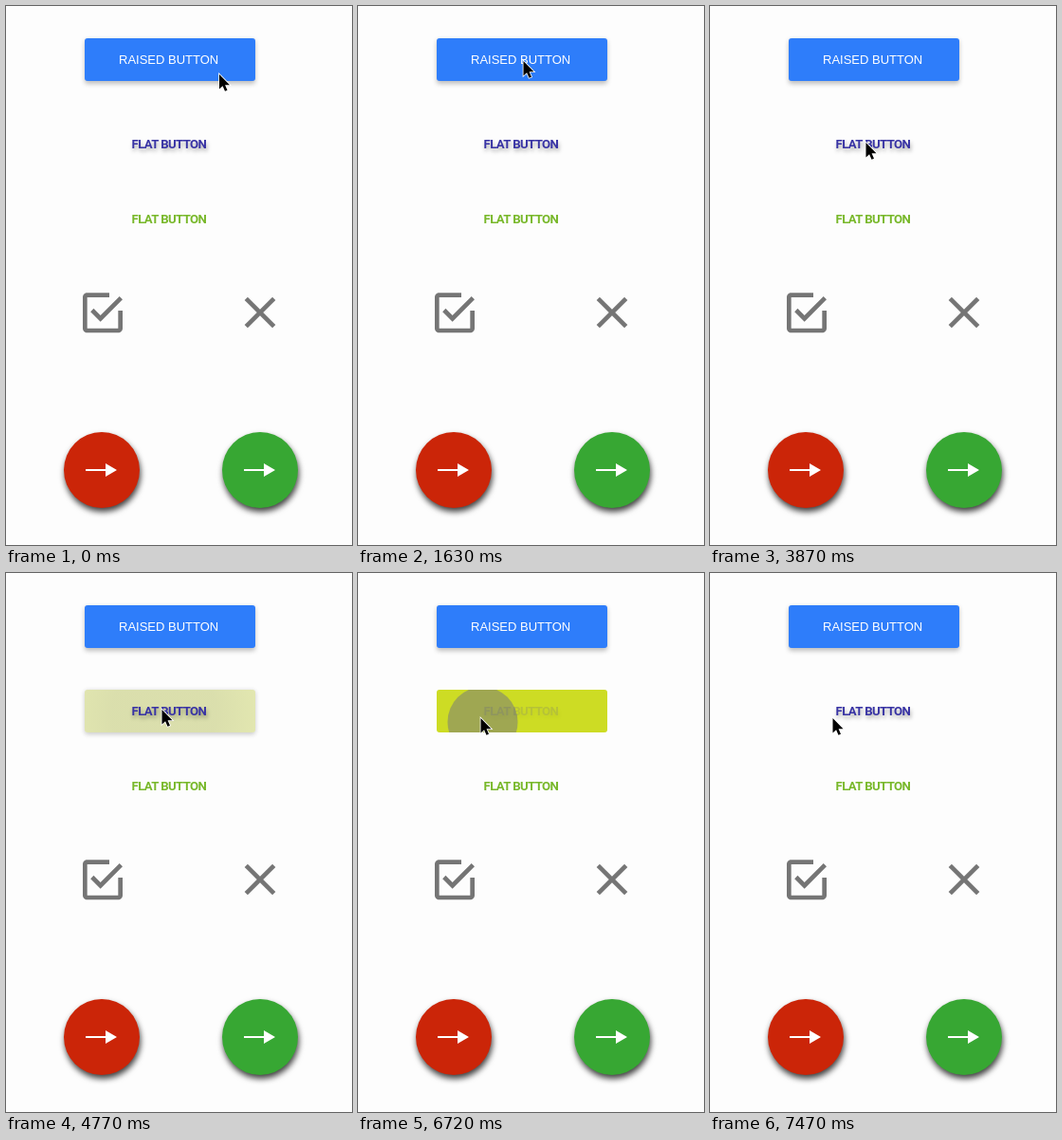
Animation, 365 px wide and 568 px high, one loop 8000 ms. Source, as an HTML page:

```html
<!DOCTYPE html>
<html lang="en">
<head>
<meta charset="utf-8">
<title>Buttons</title>
<style>
  html, body { margin: 0; width: 100%; height: 100%; overflow: hidden; background: #fdfdfd; }
  svg { display: block; width: 100%; height: 100%; }
  text { white-space: pre; }
  .raised { font: 13px "Liberation Sans", Arial, sans-serif; fill: #fff; }
  .flat { font: bold 13.2px Roboto, "Liberation Sans", sans-serif; letter-spacing: -.6px; }
  .lift { filter: drop-shadow(1px 3px 2px rgba(0, 0, 0, .32)); }
  .soft { filter: blur(2.5px); }
  .fab { filter: drop-shadow(1.5px 4px 3px rgba(0, 0, 0, .75)); }
</style>
</head>
<body>
<svg viewBox="0 0 365 568">
  <defs>
    <radialGradient id="fade">
      <stop offset=".5" stop-color="#737480"/>
      <stop offset="1" stop-color="#737480" stop-opacity=".5"/>
    </radialGradient>
    <clipPath id="raisedClip"><rect x="83" y="34" width="180" height="45" rx="3"/></clipPath>
    <clipPath id="flatClip"><rect x="83" y="123" width="180" height="45" rx="3"/></clipPath>
    <g id="arrow" fill="#fff">
      <path d="M-17 -1H5V1H-17z M4 -7L16 0L4 7z"/>
    </g>
  </defs>

  <rect id="raisedShadow" class="soft" x="83" y="36" width="180" height="46" rx="3" fill="#000"/>
  <rect x="83" y="34" width="180" height="45" rx="3" fill="#2e7dfa"/>
  <g clip-path="url(#raisedClip)"><circle id="raisedRipple"/></g>
  <text class="raised" x="119" y="60.5">RAISED BUTTON</text>

  <rect id="flatShadow" class="soft" x="83" y="124" width="180" height="46" rx="3" fill="#000"/>
  <rect id="flatBase" x="83" y="123" width="180" height="45" rx="3" fill="#fdfdfd"/>
  <rect id="flatFill" x="83" y="123" width="180" height="45" rx="3" fill="#cddc24"/>
  <g clip-path="url(#flatClip)"><circle id="flatRipple"/></g>
  <g id="flatText"><text class="flat lift" x="132.5" y="150.2" fill="#3833a4">FLAT BUTTON</text></g>

  <text class="flat" x="132.5" y="229.2" fill="#78b82a">FLAT BUTTON</text>

  <g fill="#757575">
    <path transform="translate(74 295.3) scale(2.333)" d="M19 19H5V5h10V3H5c-1.1 0-2 .9-2 2v14c0 1.1.9 2 2 2h14c1.1 0 2-.9 2-2v-8h-2zM7.91 10.08L6.5 11.5 11 16 21 6 19.59 4.58 11 13.17z"/>
    <path transform="translate(240 295) scale(2.333)" d="M19 6.41L17.59 5 12 10.59 6.41 5 5 6.41 10.59 12 5 17.59 6.41 19 12 13.41 17.59 19 19 17.59 13.41 12z"/>
  </g>

  <circle class="fab" cx="101" cy="489" r="40" fill="#cb2508"/>
  <circle class="fab" cx="268" cy="489" r="40" fill="#37a733"/>
  <use href="#arrow" x="101" y="489"/>
  <use href="#arrow" x="268" y="489"/>

  <path id="cursor" d="M0 0V15.5L3.6 12.2L6 17.8L8.5 16.7L6.1 11.2H11z" stroke="#fff" stroke-width="1.6" paint-order="stroke"/>
</svg>
<script>
const LOOP = 8000, STEP = 150;
const $ = id => document.getElementById(id);
const set = (id, attrs) => { for (const k in attrs) $(id).setAttribute(k, attrs[k]); };

// Cursor moves: start time, number of steps, destination
const moves = [[1180, 4, 174.5, 58], [3120, 6, 164.5, 144], [5970, 3, 129.5, 153]];
// Presses: start time, time the button is at rest again
const raisedPresses = [[290, 740], [2070, 2670]];
const flatPresses = [[4320, 5070], [6720, 7470]];

const raised = { r: [37, 100, 105], tint: [.5, .35, .12], shadow: [.1, .12, .19] };
const flat = {
  r: [37, 95, 120, 110, 110], tint: [.5, .4, .28, .16, .05],
  fill: [1, 1, .66, .33, .1], shadow: [0, 0, .1, .2, .1], text: [.15, .2, .6, 1, 1]
};

function cursorAt(t) {
  let x = 225, y = 72;
  for (const [start, n, toX, toY] of moves) {
    if (t < start) break;
    const p = Math.min(1, (Math.floor((t - start) / STEP) + 1) / n);
    const e = p * p * (3 - 2 * p);
    x += (toX - x) * e;
    y += (toY - y) * e;
  }
  return [x, y];
}

// Index of the current press step, or -1 at rest
function pressStep(t, presses, count) {
  const press = presses.find(([start, end]) => t >= start && t < end);
  return press ? Math.min(count - 1, Math.floor((t - press[0]) / STEP)) : -1;
}

function ripple(id, style, k, x, y) {
  set(id, {
    cx: x + 2, cy: y + 4, r: k < 0 ? 0 : style.r[k],
    opacity: k < 0 ? 0 : style.tint[k],
    fill: k < 2 ? "#737480" : "url(#fade)"
  });
}

function draw() {
  const t = performance.now() % LOOP;
  const [x, y] = cursorAt(t);
  set("cursor", { transform: `translate(${x} ${y})` });

  const a = pressStep(t, raisedPresses, 3);
  ripple("raisedRipple", raised, a, x, y);
  set("raisedShadow", { opacity: raised.shadow[a] ?? .25 });

  const b = pressStep(t, flatPresses, 5);
  ripple("flatRipple", flat, b, x, y);
  set("flatFill", { opacity: flat.fill[b] ?? 0 });
  set("flatShadow", { opacity: flat.shadow[b] ?? 0 });
  set("flatText", { opacity: flat.text[b] ?? 1 });

  requestAnimationFrame(draw);
}
draw();
</script>
</body>
</html>
```
